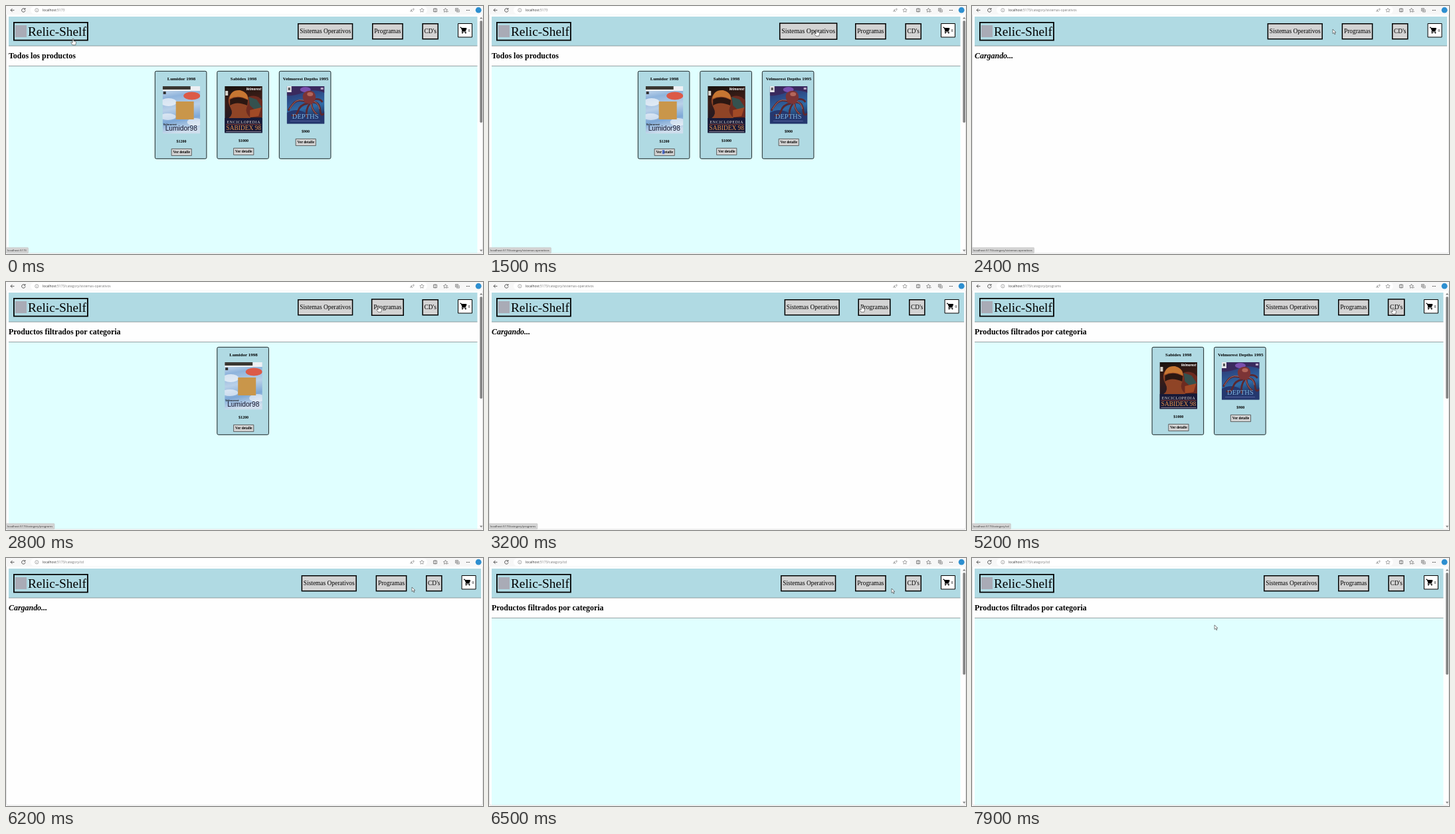
An HTML page with a canvas for the animation above (8 s loop, 718 px wide and 374 px high).

```html
<!DOCTYPE html>
<html lang="es">
<head>
<meta charset="utf-8">
<title>Relic-Shelf</title>
<style>
html, body { margin: 0; width: 100%; height: 100%; overflow: hidden; background: #fff; }
canvas { display: block; width: 100%; height: 100%; }
</style>
</head>
<body>
<canvas id="stage" width="718" height="374"></canvas>
<script>
const ctx = document.getElementById('stage').getContext('2d');
const LOOP = 8000, STEP = 100;
const SERIF = '"Liberation Serif", serif', SANS = '"Open Sans", sans-serif';
const BLUE = '#b0dae3', CYAN = '#e0ffff', GREY = '#d3d3d3', RULE = '#7c8a8c';

// ---- timeline: each entry holds from its time until the next ----
const at = (track, t) => track.filter(k => k[0] <= t).pop()[1];
const PAGES = [
  [0, { title: 'Todos los productos', items: [0, 1, 2] }],
  [100, { title: 'Todos los productos', items: [0, 1, 2], selection: true }], [1600, null],
  [2700, { title: 'Productos filtrados por categoria', items: [0] }], [3000, null],
  [4200, { title: 'Productos filtrados por categoria', items: [1, 2] }], [5400, null],
  [6400, { title: 'Productos filtrados por categoria', items: [] }]
];
const SYSTEMS = '/category/sistemas-operativos', PROGRAMS = '/category/programs', DISCS = '/category/cd';
const URLS = [[0, ''], [1700, SYSTEMS], [3300, PROGRAMS], [5600, DISCS]];
const STATUS = [[0, ''], [700, SYSTEMS], [2600, PROGRAMS], [4900, DISCS], [6100, null]];
const POINTER = [
  [0, 101, 49.5], [100, 125, 52], [300, 300, 58], [500, 560, 42], [600, 624, 42], [800, 493, 36],
  [2200, 493, 36], [2400, 543, 35], [2600, 561, 36], [4400, 561, 36], [5200, 634, 39],
  [5500, 634, 39], [5800, 613, 44], [6200, 611, 44], [6500, 606, 46], [6900, 606, 46],
  [7100, 560, 44], [7400, 330, 150], [7800, 364, 101], [7900, 365, 101]
];

function pointerAt(t) {
  const i = POINTER.findIndex(k => k[0] > t);
  if (i < 0) return POINTER[POINTER.length - 1].slice(1);
  const [t0, x0, y0] = POINTER[i - 1], [t1, x1, y1] = POINTER[i];
  const p = (t - t0) / (t1 - t0);
  return [x0 + (x1 - x0) * p, y0 + (y1 - y0) * p];
}

// ---- drawing helpers ----
function rect(x, y, w, h, fill) {
  ctx.fillStyle = fill;
  ctx.fillRect(x, y, w, h);
}

function frame(x, y, w, h, fill, line = 1, radius = 0, stroke = '#000') {
  ctx.beginPath();
  ctx.roundRect(x + line / 2, y + line / 2, w - line, h - line, radius);
  ctx.fillStyle = fill;
  ctx.fill();
  ctx.lineWidth = line;
  ctx.strokeStyle = stroke;
  ctx.stroke();
}

function text(str, x, y, font, color = '#000', align = 'left') {
  ctx.font = font;
  ctx.fillStyle = color;
  ctx.textAlign = align;
  ctx.fillText(str, x, y);
  return ctx.measureText(str).width;
}

function path(d, fill, stroke, line = 1) {
  const p = new Path2D(d);
  if (fill) { ctx.fillStyle = fill; ctx.fill(p); }
  if (stroke) { ctx.strokeStyle = stroke; ctx.lineWidth = line; ctx.stroke(p); }
}

function ellipse(x, y, rx, ry, fill) {
  ctx.beginPath();
  ctx.ellipse(x, y, rx, ry, 0, 0, 2 * Math.PI);
  ctx.fillStyle = fill;
  ctx.fill();
}

function gradient(h, ...colors) {
  const g = ctx.createLinearGradient(0, 0, 14, h);
  colors.forEach((c, i) => g.addColorStop(i / (colors.length - 1), c));
  return g;
}

function shifted(x, y, draw) {
  ctx.save();
  ctx.translate(x, y);
  draw();
  ctx.restore();
}

// ---- box art, 56.5 wide ----
function systemArt(h) {
  rect(0, 0, 57, h, gradient(h, '#dfe9f4', '#8fb4dc', '#b9d0e8', '#7ea8d6', '#cfdeed'));
  ellipse(9, 24, 12, 6, '#ffffffa0');
  ellipse(8, 46, 12, 5, '#ffffff90');
  ellipse(49, 54, 12, 6, '#ffffff90');
  rect(0, 0, 57, 7, '#eef0f4');
  rect(0, 0, 42, 5, '#3a3732');
  rect(1, 8, 4, 4, '#333');
  ellipse(44, 14.5, 12.5, 6, '#dc5a48');
  rect(20, 23, 27, 27, '#c9964a');
  text('Velmorest', 1, 58.5, 'bold 4px ' + SANS, '#222');
  text('Lumidor98', 4, 67, '10.2px "Liberation Sans", sans-serif', '#14142c');
}

function encyclopediaArt(h) {
  rect(0, 0, 57, h, gradient(h, '#17120f', '#3a1c16', '#241a24', '#151530'));
  path('M28 20Q46 8 57 22V47H26Z', '#6d2b20');
  path('M36 16l12 4 8 12-9 5-9-8z', '#34514f');
  path('M38 36l17-4-4 13-13 2z', '#a24a26');
  path('M6 48Q14 42 9 33Q1 18 12 9Q25 2 34 13Q38 24 33 32Q30 40 39 48Z', '#8f4426');
  path('M7 19Q9 5 23 6Q35 9 35 20Q20 12 7 19Z', '#c67632');
  path('M8 20Q20 13 35 21L34 29Q18 22 8 29Z', '#2b1712');
  rect(0, 48, 57, h - 48, '#181a38');
  rect(1, 7, 4, 7, '#d8d4cc');
  text('Velmorest', 55, 5.5, 'italic bold 4.8px ' + SANS, '#fff', 'right');
  ctx.letterSpacing = '0.7px';
  text('ENCICLOPEDIA', 28.6, 55.5, '5.8px ' + SERIF, '#f0e8e0', 'center');
  ctx.letterSpacing = '0px';
  rect(2, 57, 53, 0.7, '#b04a32');
  text('SABIDEX 98', 28.5, 66, '9.4px ' + SERIF, '#e8934a', 'center');
  rect(2, 68, 53, 0.8, '#a8a0b0');
}

function oceanArt(h) {
  rect(0, 0, 57, h, gradient(h, '#3c2f66', '#2c4a86', '#2f6ba6', '#1c2852'));
  path('M0 40Q14 32 28 40T57 38V57H0Z', '#25386f');
  path('M0 0H57V10Q40 3 26 9T0 14Z', '#3a2a5e');
  ellipse(28, 5, 8, 4, '#7a4fae');
  ctx.lineCap = 'round';
  path('M30 24Q16 18 9 27T3 36M31 26Q20 28 17 37T8 44M34 27Q28 36 30 46M37 26Q38 37 45 42M39 24Q49 24 50 35T55 42M38 21Q48 17 53 23',
    null, '#5a2830', 2.8);
  path('M30 23Q17 17 10 26T4 35M36 25Q38 36 44 41M38 23Q48 23 49 34', null, '#c58a7c', 0.7);
  path('M27 25Q20 12 29 8Q39 4 43 13Q45 22 37 27Z', '#7c3436');
  ellipse(35, 12, 4.5, 3, '#b4665a');
  rect(0, 0, 7, 9, '#e6e6ea');
  rect(2, 2, 3, 4, '#555');
  rect(51, 2, 4, 3, '#b9a9c8');
  text('DEPTHS', 28, 49, '10.5px ' + SERIF, '#7fb4dd', 'center');
  rect(5, 52, 45, 1, '#53609c');
}

const PRODUCTS = [
  { name: 'Lumidor 1998', price: '$1200', h: 71.5, art: systemArt },
  { name: 'Sabidex 1998', price: '$1000', h: 70.5, art: encyclopediaArt },
  { name: 'Velmorest Depths 1995', price: '$900', h: 56.5, art: oceanArt }
];

function card({ name, price, h, art }, cx) {
  frame(cx - 39.4, 97.8, 78.6, 133, BLUE, 1, 2, '#1c2526');
  text(name, cx + 0.8, 112.2, 'bold 7px ' + SERIF, '#000', 'center');
  shifted(cx - 27.5, 121, () => {
    ctx.beginPath();
    ctx.rect(0, 0, 56.5, h);
    ctx.clip();
    art(h);
  });
  const below = 121 + h;
  text(price, cx + 0.8, below + 13, 'bold 6px ' + SERIF, '#000', 'center');
  frame(cx - 14.5, below + 22.5, 31, 11, GREY, 0.8, 0, '#444');
  text('Ver detalle', cx + 1, below + 29.8, 'bold 5.5px ' + SERIF, '#000', 'center');
}

// ---- browser chrome ----
function address(route, x, y, size, dim) {
  const font = size + 'px ' + SANS;
  const w = text('localhost', x, y, font, '#333');
  return w + text(':5173' + route, x + w, y, font, dim);
}

function toolbar(route) {
  rect(0, 0, 718, 13, '#f7f7f7');
  ctx.beginPath();
  ctx.roundRect(37, 0.5, 597, 11.5, 6);
  ctx.fillStyle = '#fff';
  ctx.fill();
  address(route, 55, 8, 4.95, '#777');
  const ink = '#555';
  path('M12.5 6.3H7M9.5 3.8L7 6.3l2.5 2.5', null, '#333', 0.8);
  path('M28.3 4.6A2.7 2.7 0 1 0 29 6.5M28.9 3v2h-2', null, '#333', 0.8);
  path('M43.7 6.3a2.6 2.6 0 1 0 5.2 0a2.6 2.6 0 1 0-5.2 0M46.3 6v1.7M46.3 4.6v.6', null, '#777', 0.6);
  text('A', 608.5, 8.6, '5.5px ' + SANS, ink);
  path('M612.3 4.2q1 .8 0 1.8M613.3 3.2q2 1.6 0 3.6', null, ink, 0.5);
  path('M626 3.2l1 2 2.1.3-1.5 1.5.4 2.2-2-1.1-2 1.1.4-2.2-1.5-1.5 2.1-.3z', null, ink, 0.5);
  path('M643.5 4h5v4.6h-5zM646 3.2v6.2', null, ink, 0.7);
  path('M661.5 3.2l1 2 2 .3-1.4 1.5.3 2.2-1.9-1.1-1.9 1.1.3-2.2-1.4-1.5 2-.3zM664 8.2h2', null, ink, 0.6);
  path('M676.5 3.5h4v4h-4zM678 9h4.3V5M678.5 4.3v2.4M677.3 5.5h2.4', null, ink, 0.6);
  for (let i = 0; i < 3; i++) ellipse(693.4 + i * 2, 6.4, 0.55, 0.55, '#222');
  ellipse(711.2, 6.2, 4.4, 4.4, '#2d8fd0');
}

function scrollbar() {
  path('M713 19.5l2.2-3 2.2 3zM713 367.5l2.2 3 2.2-3z', '#858585');
  ctx.beginPath();
  ctx.roundRect(713.3, 22, 3.7, 154, 1.8);
  ctx.fillStyle = '#858585';
  ctx.fill();
}

function statusBar(route) {
  ctx.font = '4.27px ' + SANS;
  const w = ctx.measureText('localhost:5173' + route).width;
  frame(0, 364, w + 5, 9, '#d4d4d4', 0.6, 1, '#c2c2c2');
  address(route, 2, 370.2, 4.27, '#333');
}

// ---- page header ----
const LINKS = [
  { label: 'Sistemas Operativos', x: 439, w: 83.3 },
  { label: 'Programas', x: 551, w: 46.8 },
  { label: "CD's", x: 626.4, w: 24.6 }
];
const inside = ([px, py], x, y, w, h) => px >= x && px <= x + w && py >= y && py <= y + h;

function header(dx, pointer) {
  let hovering = inside(pointer, 11, 24, 113, 28);
  rect(4, 16, 705.5 + dx, 44, BLUE);
  rect(4, 59.7, 705.5 + dx, 0.8, RULE);
  frame(11, 24, 112.8, 28.5, BLUE, 1.8);
  rect(14, 29, 17, 18, '#a9abb6');
  text('Relic-Shelf', 33, 45, '19.3px ' + SERIF);

  for (const { label, x, w } of LINKS) {
    const hot = inside(pointer, x + dx, 25.5, w, 25);
    hovering ||= hot;
    shifted(x + dx + w / 2, 38.2, () => {
      if (hot) ctx.scale(1.05, 1.05);
      frame(-w / 2, -12.3, w, 24.6, GREY, 1.5);
      text(label, 0, 3, '9.4px ' + SERIF, '#000', 'center');
    });
  }

  shifted(680 + dx, 26, () => {
    frame(0, 0, 22, 21.5, '#fff', 1);
    path('M3.2 6.2h1.7l2.3 5.2h4.2l1.7-3.6', null, '#000', 1.1);
    path('M5.3 7h8l-1.9 4H7z', '#000');
    path('M7.1 11.2l-.9 1.8h6.4', null, '#000', 1);
    ellipse(7, 14.6, 1, 1, '#000');
    ellipse(11.9, 14.6, 1, 1, '#000');
    text('0', 15.8, 12.8, '5.5px ' + SERIF);
  });
  return hovering;
}

function cursor([x, y], hand) {
  shifted(x, y, () => {
    ctx.lineJoin = 'round';
    if (hand) path('M-.8 0Q0-.8.8 0V3.2L3.6 3.9Q4.7 4.3 4.5 5.8L3.7 9.3H-.8L-3.2 6Q-3.3 4.7-2 5.1L-.8 6Z', '#fff', '#333', 0.6);
    else path('M0 0V6.6L1.6 5.2 2.8 7.8 3.9 7.3 2.8 4.8H4.9Z', '#fff', '#333', 0.6);
  });
}

function render(now) {
  const t = Math.floor(now % LOOP / STEP) * STEP;
  const page = at(PAGES, t), status = at(STATUS, t), pointer = pointerAt(t);

  rect(0, 0, 718, 374, '#fefefe');
  toolbar(at(URLS, t));
  if (page) {
    text(page.title, 4, 79, 'bold 11.95px ' + SERIF);
    rect(4, 91, 705.5, 282, CYAN);
    rect(4, 90.2, 705.5, 0.8, RULE);
    const first = 356.7 - (page.items.length - 1) * 46.75;
    page.items.forEach((id, i) => card(PRODUCTS[id], first + i * 93.5));
    if (page.selection) rect(260.8, 217, 3.4, 6.2, '#3a62d8c0');
    scrollbar();
  } else {
    text('Cargando...', 4, 79, 'italic bold 11.95px ' + SERIF);
  }
  const hovering = header(page ? 0 : 5.6, pointer);
  path('M.5 13V370Q.5 372.9 3 372.9H715Q717.5 372.9 717.5 370V13', null, '#dcdcdc', 0.8);
  if (status !== null) statusBar(status);
  cursor(pointer, hovering);
}

const start = performance.now();
function tick() {
  render(performance.now() - start);
  requestAnimationFrame(tick);
}
tick();
</script>
</body>
</html>
```
